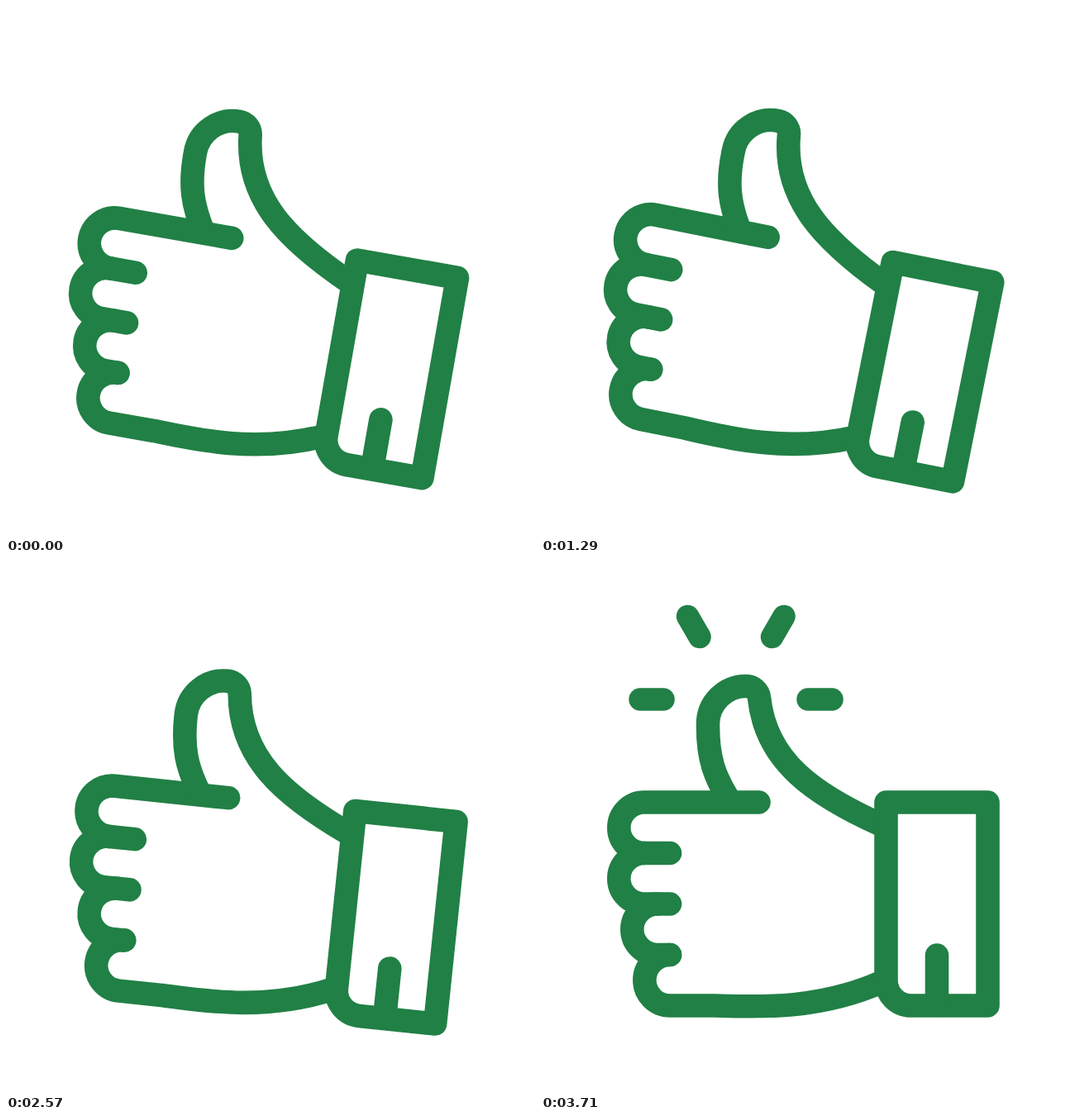
An HTML page for the animation above (6 s loop, 640 px wide and 640 px high).

```html
<!DOCTYPE html>
<html lang="en">
<head>
<meta charset="utf-8">
<title>Thumbs up</title>
<style>
  html, body { margin: 0; width: 100%; height: 100%; overflow: hidden; background: #fff; }
  svg { display: block; width: 100%; height: 100%; }
  path { fill: none; stroke: #218045; stroke-width: 28.6; stroke-linecap: round; stroke-linejoin: round; }
  #sparks path { stroke-width: 27.5; }
</style>
</head>
<body>
<svg viewBox="0 0 640 640">
  <g id="hand">
    <path d="M263.5 289.5H125A30.75 30.75 0 0 0 125 351H156"/>
    <path d="M125 351A30.75 30.75 0 0 0 125 412.5H156"/>
    <path d="M141 412.5A30.75 30.75 0 0 0 141 474H156"/>
    <path d="M156 474A30.75 30.75 0 0 0 156 535.5H210C262 537 335 541 412 507"/>
    <path d="M226 284C210 258 202 236 202 198V195A46 46 0 0 1 248 149A16 16 0 0 1 264 163C272 240 330 280 412 317"/>
    <path d="M417.5 289.5H540.5V535.5H448A30.5 30.5 0 0 1 417.5 505Z"/>
    <path d="M479 474.5V535"/>
  </g>
  <g id="sparks"></g>
</svg>
<script>
const LOOP = 6000, FPS = 14, END = 3710;
const PIVOT = "318 341";
const SWINGS = [[-200, 6], [190, 13.4], [630, 6], [1060, 13.7], [1600, 5.5], [2030, 9.8]];
// inner end, then offset to the outer end
const SPARKS = [[148, 165, -28, 0], [192, 89.5, -14.5, -25], [279.5, 89.5, 14.5, -25], [323, 165, 29, 0]];

const hand = document.getElementById("hand");
const sparks = document.getElementById("sparks");
const rays = SPARKS.map(() =>
  sparks.appendChild(document.createElementNS("http://www.w3.org/2000/svg", "path")));

const clamp = x => Math.min(1, Math.max(0, x));
const easeInOut = u => u < 0.5 ? 4 * u ** 3 : 1 - 4 * (1 - u) ** 3;

function angleAt(t) {
  for (let i = 1; i < SWINGS.length; i++) {
    const [t0, a] = SWINGS[i - 1], [t1, b] = SWINGS[i];
    if (t < t1) return a + (b - a) * easeInOut((t - t0) / (t1 - t0));
  }
  const [start, peak] = SWINGS[SWINGS.length - 1];
  const u = clamp((t - start) / (END - start));
  return peak * (1 - u) ** 2 * (1 + u);
}

function draw(ms) {
  const step = Math.floor((ms % LOOP + 5) * FPS / 1000);
  const t = Math.min(END, step * 1000 / FPS);
  hand.setAttribute("transform", `rotate(${angleAt(t)} ${PIVOT})`);

  const grow = 1 - (1 - clamp((t - 3300) / (END - 3300))) ** 2;
  sparks.style.display = grow > 0 ? "" : "none";
  SPARKS.forEach(([x, y, dx, dy], i) =>
    rays[i].setAttribute("d", `M${x} ${y}l${dx * grow} ${dy * grow}`));
}

const begin = performance.now();
function tick() {
  draw(performance.now() - begin);
  requestAnimationFrame(tick);
}
tick();
</script>
</body>
</html>
```
